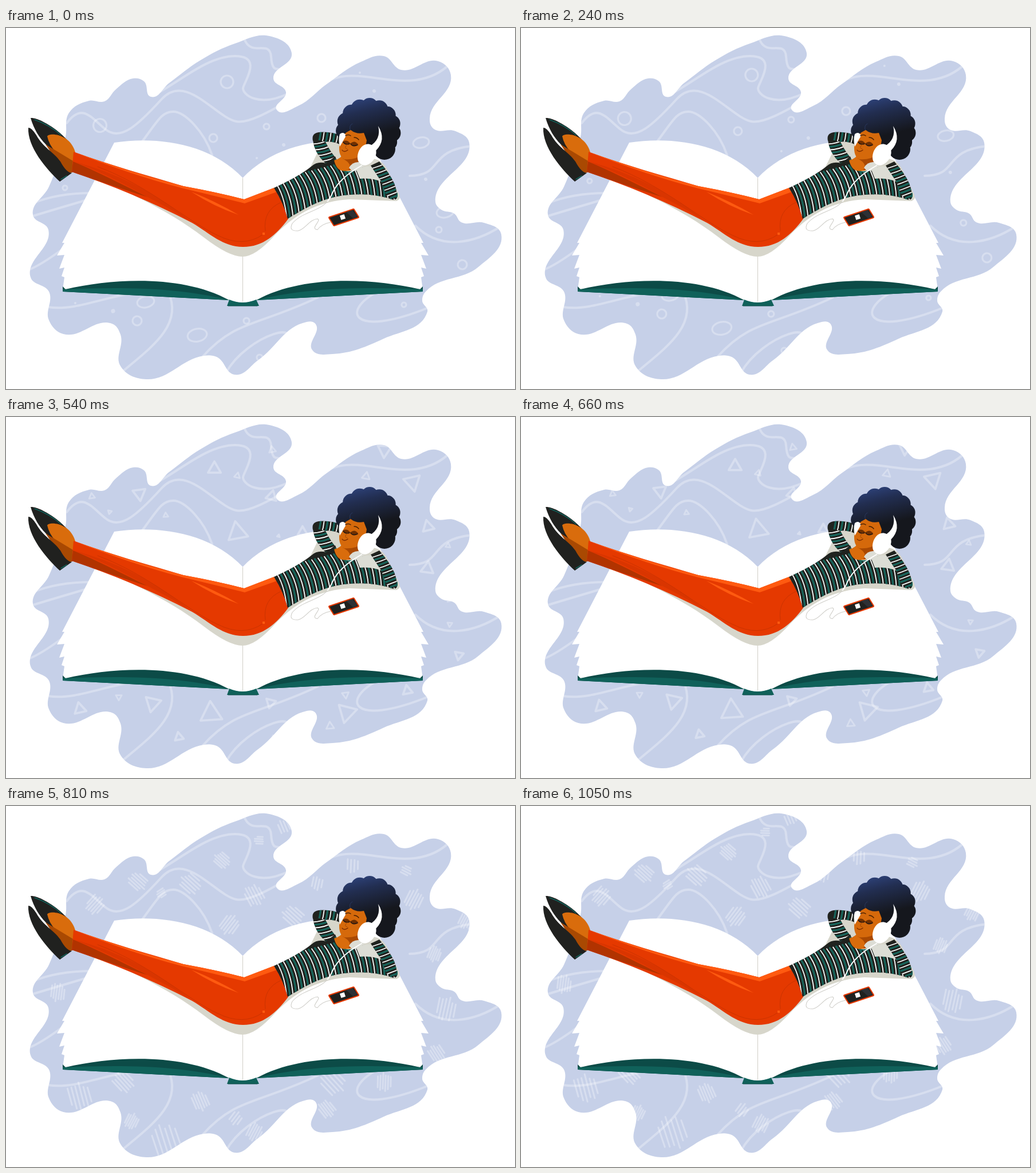
Write an HTML page with a canvas that moves like this. It is 889 by 630 pixels and loops after 1.08 s.

```html
<!DOCTYPE html>
<html lang="en">
<head>
<meta charset="utf-8">
<title>Listening on a book</title>
<style>
html, body { margin: 0; width: 100%; height: 100%; overflow: hidden; background: #fff; }
canvas { display: block; }
</style>
</head>
<body>
<canvas id="stage" width="889" height="630"></canvas>
<script>
const c = document.getElementById('stage').getContext('2d');
c.lineCap = c.lineJoin = 'round';

const svg = d => new Path2D(d);
const fill = (path, color) => { c.fillStyle = color; c.fill(path); };
const stroke = (path, color, width) => {
  c.strokeStyle = color;
  c.lineWidth = width;
  c.stroke(path);
};
const groups = (flat, size) =>
  Array.from({ length: flat.length / size }, (_, i) => flat.slice(i * size, (i + 1) * size));

// Closed smooth outline; each tangent bisects its two neighbouring segments.
function smooth(pts) {
  const n = pts.length, at = i => pts[(i + n) % n];
  const span = (p, q) => Math.hypot(q[0] - p[0], q[1] - p[1]);
  const unit = (p, q) => [0, 1].map(k => (q[k] - p[k]) / span(p, q));
  const tangent = i => {
    const u = unit(at(i - 1), at(i)), v = unit(at(i), at(i + 1));
    const s = [u[0] + v[0], u[1] + v[1]], l = Math.hypot(...s);
    return s.map(k => k / l);
  };
  const path = new Path2D();
  path.moveTo(...pts[0]);
  pts.forEach((p, i) => {
    const q = at(i + 1), d = span(p, q) * .37, u = tangent(i), v = tangent(i + 1);
    path.bezierCurveTo(p[0] + u[0] * d, p[1] + u[1] * d, q[0] - v[0] * d, q[1] - v[1] * d, ...q);
  });
  return path;
}

const sky = smooth(groups([
  104,190, 110,148, 145,127, 172,128, 192,107, 222,88, 241,93, 253,120, 285,96, 340,56,
  400,27, 460,14, 499,44, 467,88, 489,112, 473,143, 510,136, 560,98, 620,59, 660,49,
  690,73, 755,58, 777,82, 740,158, 747,176, 785,180, 809,200, 750,303, 760,317, 783,324,
  795,339, 835,340, 865,360, 825,417, 733,460, 727,476, 736,495, 660,542, 570,569, 535,562,
  541,517, 525,513, 440,580, 400,605, 368,574, 345,572, 245,613, 200,590, 200,535, 185,516,
  100,534, 75,510, 75,460, 43,435, 74,352, 47,326, 75,277
], 2));

const waves = [
  'M106 166C133 130 148 156 174 177S230 170 272 124S365 155 402 163S530 95 585 85S720 120 778 60',
  'M238 198C265 162 272 146 292 146S346 180 360 222',
  'M258 117C300 97 350 49 400 49S415 95 414 105S440 140 494 114',
  'M417 21C429 50 461 20 463 50S475 68 478 73',
  'M705 258C765 258 735 214 814 206',
  'M715 345C760 390 820 375 866 345',
  'M660 455C580 490 600 545 740 487',
  'M344 573C400 510 440 520 545 470',
  'M384 602C420 535 540 500 472 568',
  'M74 487C120 495 180 466 230 462',
  'M284 462C310 520 250 560 203 600',
  'M44 329Q90 315 155 296',
  'M46 306Q90 288 150 288',
  'M42 421Q66 411 112 376'
].map(svg);

// x, y, radius: small ones are dots, large ones flatten
const rings = groups([
  386,94,11, 164,170,11.5, 362,192,7, 455,172,5, 551,157,7, 485,204,3, 438,227,2, 618,78,2,
  643,110,3, 725,200,14, 767,321,15, 756,352,5, 797,413,8, 229,511,8, 187,494,3.6, 244,478,15,
  334,536,17, 420,511,5, 443,575,5, 121,480,2, 695,483,4, 103,279,4, 733,264,3
], 3);

// x, y, radius; a negative radius points down
const triangles = groups([
  354,95,13, 394,107,6, 455,62,7, 490,32,-11, 454,143,11, 223,138,-13, 140,143,6, 171,170,-4,
  269,176,5, 394,206,20, 466,212,3, 508,205,10, 700,118,-17, 619,108,8, 651,62,-14, 727,196,12,
  726,269,13, 762,229,5, 767,321,8, 765,366,-5, 781,420,-9, 119,514,12, 187,493,-6,
  246,504,-16, 292,563,9, 348,522,22, 452,503,-10, 457,565,5, 583,489,-7, 585,520,-19,
  556,544,8, 691,482,10
], 3);

// x, y, half width, slant in degrees
const hatches = groups([
  377,95,14,-45, 442,60,8,-85, 485,36,11,-20, 230,132,16,-45, 271,152,8,60, 155,172,16,45,
  322,136,18,-45, 390,207,17,40, 433,156,18,-25, 501,192,18,-45, 543,135,11,15, 605,104,12,5,
  699,113,9,-60, 712,163,17,30, 748,258,13,25, 803,200,14,30, 90,325,15,10, 768,354,20,15,
  752,432,15,-30, 660,482,15,5, 570,482,22,-40, 560,529,15,-35, 339,515,16,-20, 128,507,23,-12,
  205,482,18,-40, 219,550,13,30, 279,584,28,-15, 434,569,15,30, 401,545,11,40
], 4);

const pale = 'rgba(255,255,255,.29)';
const place = (x, y, deg, draw) => {
  c.save();
  c.translate(x, y);
  c.rotate(deg * Math.PI / 180);
  draw();
  c.restore();
};

function drawRings() {
  for (const [x, y, r] of rings) {
    const p = new Path2D();
    p.ellipse(x, y, r, r > 13 ? r * .65 : r, -.2, 0, 7);
    if (r < 4) fill(p, pale);
    else stroke(p, pale, 3.2);
  }
}

function drawTriangles() {
  triangles.forEach(([x, y, r], i) => place(x, y, 14 * Math.sin(i * 2), () => {
    stroke(svg(`M0 ${-r}L${r * .86} ${r * .5}H${-r * .86}Z`), pale, Math.abs(r) > 8 ? 3.8 : 2.8);
  }));
}

function drawHatches() {
  hatches.forEach(([x, y, r, slant], h) => place(x, y, slant, () => {
    const n = r > 12 ? 6 : 4, gap = r * 1.5 / (n - 1);
    for (let i = 0; i < n; i++) {
      const len = r * (.48 + .45 * Math.sin((i + .7) / n * Math.PI));
      const drift = Math.sin(i * 2.3 + h) * r * .16, px = (i - (n - 1) / 2) * gap;
      stroke(svg(`M${px} ${drift - len}L${px + r * .08} ${drift + len}`), pale, 3);
    }
  }));
}

// Drift per step, and the step at which the listed places hold.
const motifs = [
  { draw: drawRings, dx: 2.1, dy: -1.5, rest: 0 },
  { draw: drawTriangles, dx: 2.5, dy: -1.1, rest: 2 },
  { draw: drawHatches, dx: -1.9, dy: -1.8, rest: 3 }
];

function drawSky(step) {
  const m = motifs[Math.floor(step / 12)], k = step % 12 - m.rest;
  fill(sky, '#c6d0e8');
  c.save();
  c.clip(sky);
  waves.forEach(w => stroke(w, pale, 4));
  c.translate(m.dx * k, m.dy * k);
  m.draw();
  c.restore();
}

const green = '#10615a', deepGreen = '#0c4b47', ink = '#20211f';
const red = '#e53900', bright = '#ff5a10', rust = '#b13300';
const skin = '#d5690b', brown = '#a94902', grey = '#dcddd5';

function drawBook() {
  const page = svg(`M414 262C355 199 260 189 189 200L98 375H102L89 397L102 396L93 420L102 418
    L97 433L102 435L99 457L390 475L414 481Z`);
  const cover = svg('M99 451L104 456C190 436 310 431 390 475L99 460Z');
  const lining = svg('M99 456C200 452 300 452 390 475L99 460Z');
  for (const side of [1, -1]) {
    c.save();
    if (side < 0) { c.translate(827, 0); c.scale(-1, 1); }
    fill(page, '#fff');
    fill(cover, deepGreen);
    fill(lining, green);
    c.restore();
  }
  fill(svg('M390 474L386 485H442L437 474Q413 484 390 474Z'), green);
  stroke(svg('M388 485H439'), deepGreen, 1);
  stroke(svg('M413.5 262V478'), '#cfcec7', 1);
}

const bodyShadow = svg(`M117 247C200 279 280 315 345 365Q389 399 413 399Q436 399 470 361
  C510 320 550 302 600 299L682 302Q690 299 687 291L665 245Q655 229 640 228L580 196L552 201L490 328Z`);

function drawLegs() {
  fill(svg('M43 157C60 155 112 190 114 210L105 228C80 214 55 198 43 157Z'), ink);
  stroke(svg('M50 160Q78 170 96 187'), green, 1.5);
  fill(svg('M72 189C75 182 112 184 121 217L116 237Q78 218 72 189Z'), '#d96c0c');
  fill(svg('M69 203L117 232L116 252L104 255Z'), brown);
  fill(svg('M39 174Q45 174 53 187C65 209 83 216 95 233Q105 252 115 253L94 268C70 246 37 207 39 174Z'), ink);
  stroke(svg('M96 264L106 258'), green, 1.5);
  fill(svg(`M118 216C180 239 250 258 310 276Q370 287 416 299L468 279Q483 300 493 333
    C472 361 449 382 414 382C379 382 357 359 325 340C254 303 183 274 115 251Z`), red);
  fill(svg('M117 233Q150 246 247 295Q190 277 115 251Z'), rust);
  fill(svg('M118 233C190 252 260 285 325 340Q300 322 247 295Q180 256 118 233Z'), '#d93500');
  fill(svg('M118 216Q220 253 310 276Q370 287 416 299L468 279L473 286L417 306Q360 292 310 280Q220 257 118 216Z'), bright);
  fill(svg('M324 286Q365 302 406 326Q362 311 324 286Z'), bright);
  stroke(svg('M481 304Q448 318 453 354M160 242C250 275 320 340 370 362Q414 384 448 361'), '#cb3300', 1);
  fill(svg('M448 357h4v4h-4Z'), bright);
}

// Bands across a limb, alternating thin white and wide green.
function striped(path, n, [x, y], [dx, dy], bend) {
  fill(path, '#20231f');
  c.save();
  c.clip(path);
  for (let i = 0; i < n; i++) {
    const band = svg(`M${x + dx * i} ${y + dy * i}${bend}`);
    stroke(band, i % 2 ? '#17675d' : '#fff', i % 2 ? 3 : 1.8);
  }
  c.restore();
}

const torso = svg(`M468 279Q512 259 534 241Q544 232 559 236L575 224Q590 268 622 239L624 257
  Q650 263 674 277L684 289Q685 299 677 300Q638 286 590 292C548 298 520 316 492 333Q485 306 468 279Z`);
const nearArm = svg('M637 240L652 233Q689 275 681 299L664 292L656 269Z');
const upperArm = svg('M586 188Q566 180 546 182Q533 184 536 197L557 199Q570 197 585 204Z');
const foreArm = svg('M536 193L558 199Q566 215 576 227L559 237Q537 217 536 193Z');

function drawTorso() {
  striped(upperArm, 6, [580, 180], [-6, -.5], 'q-1 15-6 28');
  striped(foreArm, 8, [528, 202], [2, 5], 'q20 3 47-12');
  striped(torso, 40, [468, 266], [5.5, -1.4], 'q25 32 23 98');
  fill(svg('M612 248Q629 239 638 242L658 269Q638 261 618 263Z'), grey);
  striped(nearArm, 12, [633, 247], [2, 5], 'q18-5 36-13');
  stroke(svg('M575 229Q590 268 622 239'), '#17675d', 2);
}

function drawHair() {
  const hair = new Path2D();
  const puff = (x, y, rx, ry) => {
    hair.moveTo(x + rx, y);
    hair.ellipse(x, y, rx, ry, 0, 0, 7);
  };
  puff(633, 173, 45, 40);
  puff(661, 211, 19, 19);
  for (let a = -3.2; a < 1; a += .42) puff(633 + 42 * Math.cos(a), 177 + 40 * Math.sin(a), 15, 15);
  const tint = c.createLinearGradient(622, 121, 638, 187);
  tint.addColorStop(0, '#2d4178');
  tint.addColorStop(.35, '#222e51');
  tint.addColorStop(1, '#15171d');
  fill(hair, tint);
  stroke(svg('M605 167Q598 171 602 180'), '#273456', 1.2);
}

function drawHead() {
  drawHair();
  fill(svg('M573 231Q586 228 589 218H620V237Q607 252 587 249Q577 247 573 231Z'), '#d96c0c');
  fill(svg('M588 228L620 207V235Q608 249 598 248Q606 237 588 228Z'), brown);
  fill(svg('M583 198Q588 184 602 178Q612 186 625 183L630 196L626 219Q610 231 590 229Q579 222 583 198Z'), skin);
  fill(svg('M583 185Q590 180 594 188L583 207Q580 194 583 185Z'), '#fff');

  stroke(svg('M593 188Q598 185 602 188M608 191Q613 191 616 195'), '#482000', 1.5);
  fill(svg('M589 198Q595 194 601 201Q594 206 589 198ZM602 201Q609 195 615 203Q609 209 602 201Z'), '#713000');
  stroke(svg('M589 199Q593 205 600 202M602 202Q606 208 614 204'), '#251712', 1.6);
  stroke(svg('M596 203Q589 210 596 211'), brown, 1);
  stroke(svg('M587 213Q590 218 597 213'), '#792c00', 1.4);

  fill(svg('M599 244Q605 233 617 234L626 240Q617 251 604 249Z'), grey);
  fill(svg('M650 171Q665 195 646 214L634 207Q656 195 650 171Z'), '#fff');
  place(630, 221, 28, () => fill(svg('M0-19C19-19 19 10 6 18Q0 21-6 18C-19 10-19-19 0-19Z'), '#fff'));
}

const cord = svg(`M621 240Q582 262 570 288C558 322 522 316 500 341Q493 355 510 354
  C522 352 530 334 544 333C552 336 530 350 544 352Q551 342 567 339`);

function drawCord() {
  stroke(cord, '#cfcec9', 1.1);
  c.save();
  c.beginPath();
  c.rect(550, 230, 80, 73);
  c.clip();
  stroke(cord, '#fff', 2);
  c.restore();
}

function drawPhone() {
  const body = svg('M565 331L607 317L615 330L573 344Z');
  stroke(body, red, 4);
  fill(body, ink);
  fill(svg('M594 321L605 318L614 329L606 332Z'), '#2d3035');
  place(588, 330, -18, () => fill(svg('M-4-4H4V4H-4Z'), '#fff'));
}

function frame(now) {
  c.clearRect(0, 0, 889, 630);
  drawSky(Math.floor(now % 1080 / 30));
  drawBook();
  fill(bodyShadow, '#d7d6cb');
  drawLegs();
  drawTorso();
  drawHead();
  drawCord();
  drawPhone();
  requestAnimationFrame(frame);
}
frame(0);
</script>
</body>
</html>
```
